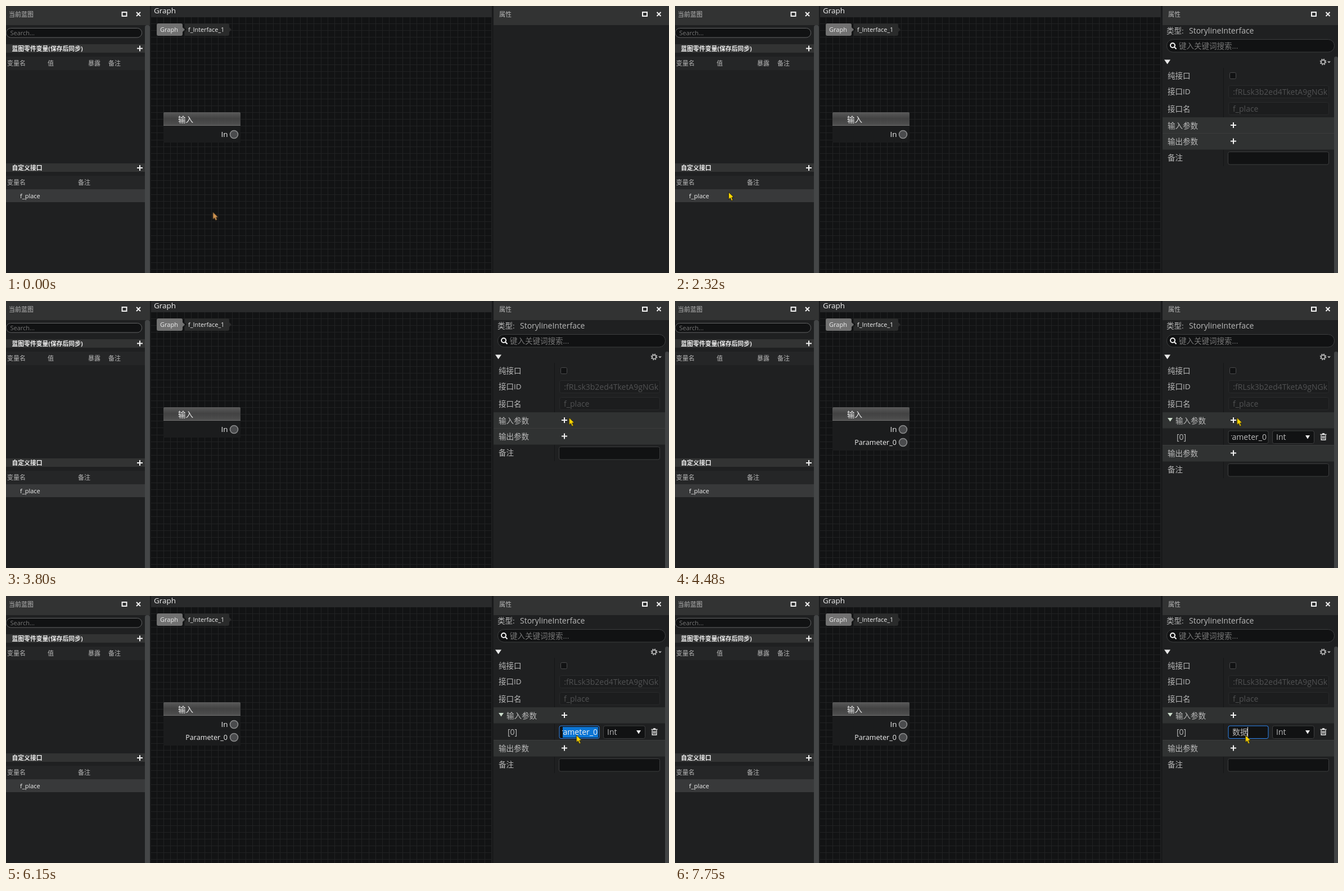
These frames come from a looping animation (1179 px wide and 475 px high, 8 s). An HTML page:

```html
<!DOCTYPE html>
<html lang="zh-CN">
<head>
<meta charset="utf-8">
<title>Blueprint editor</title>
<style>
html, body { margin: 0; width: 100%; height: 100%; overflow: hidden; background: #1f2021; }
svg { display: block; width: 1179px; height: 475px; }
text { font: 13.5px "Open Sans", "Noto Sans CJK SC", "Noto Sans CJK", sans-serif; fill: #b9b9b9; white-space: pre; }
.small text, text.small { font-size: 11px; }
text.bold { font-weight: 700; font-size: 10.8px; fill: #f0f0f0; }
text.white { fill: #f0f0f0; }
text.dim { fill: #505152; }
.lat { font-size: 14px; }
.end { text-anchor: end; }
.line { fill: none; stroke: #f2f2f2; stroke-width: 2; }
.head { fill: #323333; }
.group { fill: #303232; }
.input { fill: #111213; stroke: #3d3e3f; }
.locked { fill: #1c1d1e; stroke: #292a2b; }
.split { stroke: #141516; }
.pin { fill: #4a4b4d; stroke: #8b8c8d; stroke-width: 1.6; }

/* One loop is 8 s, so 1% is 80 ms. */
.panel, .added, .bare, .shift, .ring, .focus, .reel, .caret, .arrow { animation: 8s step-end infinite; }
.panel { animation-name: panel; }
.added { animation-name: added; }
.shift { animation-name: shift; }
.ring { animation-name: ring; fill: #ffd800; fill-opacity: .4; }
.focus { animation-name: focus; }
.reel { animation-name: reel; }
.caret { animation-name: caret; }
.arrow { animation-name: arrow; stroke-width: .9; }
.cursor { animation: cursor 8s linear infinite; }

@keyframes panel { 0% { opacity: 0 } 20.625%, 100% { opacity: 1 } }
@keyframes added { 0% { opacity: 0 } 51.625%, 100% { opacity: 1 } }
@keyframes shift { 0% { transform: none } 51.625%, 100% { transform: translate(var(--by)) } }
@keyframes focus { 0% { stroke: #3d3e3f } 70%, 100% { stroke: #3087f0 } }
@keyframes caret { 0% { opacity: 0 } 72% { opacity: 1 } 76.375% { opacity: 0 } 82.75% { opacity: 1 } 89.5%, 100% { opacity: 0 } }
@keyframes ring {
  0% { opacity: 0; transform: translate(91.5px, 329.5px) }
  18.875% { opacity: 1; transform: translate(91.5px, 329.5px) }
  21% { opacity: 0; transform: translate(1001px, 207px) }
  50.375% { opacity: 1; transform: translate(1001px, 207px) }
  52.125% { opacity: 0; transform: translate(1017px, 247px) }
  70% { opacity: 1; transform: translate(1017px, 247px) }
  71% { opacity: 0; transform: translate(1017px, 247px) }
  72% { opacity: 1; transform: translate(1017px, 247px) }
  73%, 100% { opacity: 0; transform: translate(1017px, 247px) }
}
@keyframes reel {
  0% { transform: none }
  72% { transform: translateY(-40px) }
  89.5% { transform: translateY(-80px) }
  90.25% { transform: translateY(-120px) }
  91.75% { transform: translateY(-160px) }
  93.875% { transform: translateY(-200px) }
  94.875% { transform: translateY(-240px) }
  96.875%, 100% { transform: translateY(-280px) }
}
@keyframes arrow {
  0% { fill: #d09450; stroke: #7d5a36; transform: scale(.88) }
  11% { fill: #ffd800; stroke: #151515; transform: none }
  32% { fill: #d09450; stroke: #7d5a36; transform: scale(.88) }
  39%, 100% { fill: #ffd800; stroke: #151515; transform: none }
}
@keyframes cursor {
  0%, 7.9% { transform: translate(368px, 367px); animation-timing-function: cubic-bezier(.45, 0, .7, .75) }
  12.375% { transform: translate(181px, 334px); animation-timing-function: cubic-bezier(.25, .6, .5, 1) }
  15.875%, 28.75% { transform: translate(92px, 331px); animation-timing-function: cubic-bezier(.45, .05, .65, .9) }
  38.625% { transform: translate(855px, 247px); animation-timing-function: cubic-bezier(.25, .5, .5, 1) }
  43.25%, 46.2% { transform: translate(1001px, 205px) }
  47.5%, 55.1% { transform: translate(1001px, 207px) }
  56%, 59% { transform: translate(999px, 207px); animation-timing-function: ease-in-out }
  62.125%, 63.8% { transform: translate(1023px, 253px) }
  66.125%, 76% { transform: translate(1017px, 247px) }
  76.875%, 100% { transform: translate(1014px, 247px) }
}
</style>
</head>
<body>
<svg viewBox="0 0 1179 475">
  <defs>
    <linearGradient id="title" x2="0" y2="1">
      <stop offset="0" stop-color="#626262" stop-opacity=".9"/>
      <stop offset=".5" stop-color="#4a4a4a" stop-opacity=".85"/>
      <stop offset="1" stop-color="#565656" stop-opacity=".9"/>
    </linearGradient>
    <path id="plus" class="line" d="M-5 0H5M0-5V5"/>
    <path id="window" class="line" d="M-4-3.5H4V3.5H-4ZM21.5-3.5L28.5 3.5M28.5-3.5L21.5 3.5"/>
    <clipPath id="field"><rect x="989" y="232" width="64.5" height="21"/></clipPath>
    <clipPath id="idField"><rect x="989" y="143" width="172" height="21"/></clipPath>
  </defs>

  <!-- Left panel -->
  <rect width="256" height="475" fill="#1f2021"/>
  <rect class="head" width="256" height="34"/>
  <g class="small">
    <text x="5" y="19">当前蓝图</text>
    <rect class="input" x=".5" y="39.5" width="241" height="16.5" rx="8" style="stroke:#626364"/>
    <text x="7.5" y="52" style="fill:#777">Search...</text>
    <rect class="head" y="68" width="247" height="15"/>
    <rect y="90" width="247" height="24" fill="#252627"/>
    <rect class="head" y="280" width="247" height="15"/>
    <rect y="302" width="247" height="24" fill="#252627"/>
    <rect y="326" width="247" height="23" fill="#38393a"/>
    <text class="bold" x="10.5" y="80">蓝图零件变量(保存后同步)</text>
    <text x="2" y="106">变量名</text>
    <text x="74" y="106">值</text>
    <text x="146" y="106">暴露</text>
    <text x="182" y="106">备注</text>
    <text class="bold" x="10.5" y="292">自定义接口</text>
    <text x="2" y="318">变量名</text>
    <text x="128" y="318">备注</text>
    <text class="white" x="25" y="342">f_place</text>
  </g>
  <use href="#window" x="210.5" y="14.5"/>
  <use href="#plus" x="238" y="75.5"/>
  <use href="#plus" x="238" y="288"/>
  <path d="M247 475V38q0-4 4-4h1q4 0 4 4V475Z" fill="#444647"/>

  <!-- Graph -->
  <rect x="256" width="611" height="475" fill="#191a1b"/>
  <rect x="258" y="20" width="606" height="455" fill="#121314"/>
  <path id="grid" fill="none" stroke="#212223" shape-rendering="crispEdges"/>
  <rect x="258" width="606" height="20" fill="#292a2b"/>
  <text class="white" x="263" y="13">Graph</text>
  <path d="M271 31H311q3 0 3 3V38l4 4-4 4V50q0 3-3 3H271q-3 0-3-3V34q0-3 3-3Z" fill="#717171"/>
  <path d="M318 31H394q3 0 3 3V38l4 4-4 4V50q0 3-3 3H318V46l3-4-3-4Z" fill="#2a2b2b"/>
  <text class="small white" x="274" y="46">Graph</text>
  <text class="white" x="324" y="46" style="font-size:10.8px">f_Interface_1</text>
  <g>
    <rect x="280" y="212" width="137" height="31" fill="#1b1c1d"/>
    <path d="M280 212V191q0-2 2-2H415q2 0 2 2V212Z" fill="url(#title)"/>
    <path d="M280 212.5H417" stroke="#707070"/>
    <text class="white" x="306" y="207">输入</text>
    <text class="white end" x="394.5" y="233">In</text>
    <circle class="pin" cx="405.5" cy="228.5" r="7"/>
    <g class="added">
      <rect x="280" y="243" width="137" height="23" fill="#1b1c1d"/>
      <text class="white end" x="394" y="256" style="font-size:12.6px">Parameter_0</text>
      <circle class="pin" cx="405.5" cy="251.5" r="7"/>
    </g>
  </g>

  <!-- Right panel -->
  <rect x="867" width="312" height="475" fill="#1f2021"/>
  <rect class="head" x="867" width="312" height="34"/>
  <text class="small" x="877" y="19">属性</text>
  <use href="#window" x="1136" y="14.5"/>
  <g class="panel">
    <text x="874" y="49">类型:</text>
    <text class="lat" x="914" y="49">StorylineInterface</text>
    <rect class="input" x="874.5" y="59.5" width="298" height="22.5" rx="11"/>
    <circle class="line" cx="885" cy="70" r="4"/>
    <path class="line" d="M888 73l3.5 3.5"/>
    <text x="896" y="76" style="fill:#777">键入关键词搜索...</text>
    <path d="M870 95.5H881L875.5 103.5Z" fill="#e8e8e8"/>
    <circle class="line" cx="1152.5" cy="99.5" r="4.8" style="stroke:#bbb;stroke-dasharray:2 1.77"/>
    <circle class="line" cx="1152.5" cy="99.5" r="3.3" style="stroke:#bbb;stroke-width:1.5"/>
    <path d="M1160 98.5H1166L1163 101.5Z" fill="#bbb"/>
    <path d="M1172 475V93q0-3 3.5-3t3.5 3V475Z" fill="#414344"/>
    <path class="split" d="M975.5 110V198"/>
    <text x="876" y="129">纯接口</text>
    <rect class="input" x="986.5" y="118.5" width="11" height="11" rx="2" style="stroke:#4a4b4c"/>
    <text x="876" y="157">接口ID</text>
    <rect class="locked" x="984.5" y="141.5" width="178" height="22" rx="3"/>
    <g clip-path="url(#idField)"><text class="lat dim end" x="1160" y="158">:fRLsk3b2ed4TketA9gNGk</text></g>
    <text x="876" y="188">接口名</text>
    <rect class="locked" x="984.5" y="171.5" width="178" height="22" rx="3"/>
    <text class="lat dim" x="992" y="188">f_place</text>

    <rect class="group" x="867" y="198" width="305" height="28.5"/>
    <text class="shift" style="--by:14px" x="876" y="218">输入参数</text>
    <use href="#plus" x="993" y="212" transform="translate(0 0)"/>

    <g class="added">
      <path d="M876 208H885L880.5 214.5Z" fill="#ccdccc"/>
      <path class="split" d="M975.5 227V257"/>
      <text class="lat" x="892" y="247">[0]</text>
      <rect class="input focus" x="984" y="231" width="71" height="22.5" rx="3"/>
      <g clip-path="url(#field)">
        <g class="reel" id="reel"></g>
        <path class="caret" d="M1052.5 233V251" stroke="#fff"/>
      </g>
      <rect class="input" x="1062.5" y="231" width="74" height="22.5" rx="3"/>
      <text class="lat" x="1069" y="247">Int</text>
      <path d="M1121 239H1129L1125 245.5Z" fill="#eee"/>
      <path class="line" d="M1147.5 237.5H1158.5M1151 236H1155M1149.2 239V247H1156.8V239M1151.7 240V245M1154.3 240V245" style="stroke-width:1.4"/>
    </g>

    <g class="shift" style="--by:0,30px">
      <rect class="group" x="867" y="227" width="305" height="28.5"/>
      <path d="M867 226.5H1172" stroke="#3b3c3c"/>
      <text x="876" y="246">输出参数</text>
      <use href="#plus" x="993" y="240.5"/>
      <path class="split" d="M975.5 256V285"/>
      <text x="876" y="275">备注</text>
      <rect class="input" x="983.5" y="259.5" width="179" height="22.5" rx="3"/>
    </g>
  </g>

  <circle class="ring" r="13.5" opacity="0"/>
  <g class="cursor">
    <path class="arrow" d="M.3.4V13.6L3.3 10.8 5.5 15.8 8 14.7 5.8 9.9 9.7 9.6Z"/>
  </g>
</svg>
<script>
// Grid lines, snapped to whole pixels
const step = 12.15;
let d = "";
for (let x = 268; x < 864; x += step) d += `M${Math.round(x) + .5} 20V475`;
for (let y = 189 - 13 * step; y < 475; y += step) d += `M258 ${Math.round(y) + .5}H864`;
document.getElementById("grid").setAttribute("d", d);

// Successive contents of the name field, stacked 40 px apart
const param = (y, cls) => `<text class="lat end ${cls}" x="1052" y="${y}">Parameter_0</text>`;
const typed = [["s", 998], ["sh", 1006.5], ["shu", 1015], ["shu'j", 1022], ["shu'ju", 1030.5], ["数据", 1018.5]];
document.getElementById("reel").innerHTML =
  param(247, "") +
  `<rect x="990" y="273" width="63" height="19" fill="#0b76d6"/>` + param(287, "white") +
  typed.map(([word, x], i) => {
    const y = 327 + 40 * i;
    return `<text class="lat" x="991" y="${y}">${word}</text><path d="M${x} ${y - 14}v18" stroke="#ddd"/>`;
  }).join("");
</script>
</body>
</html>
```
